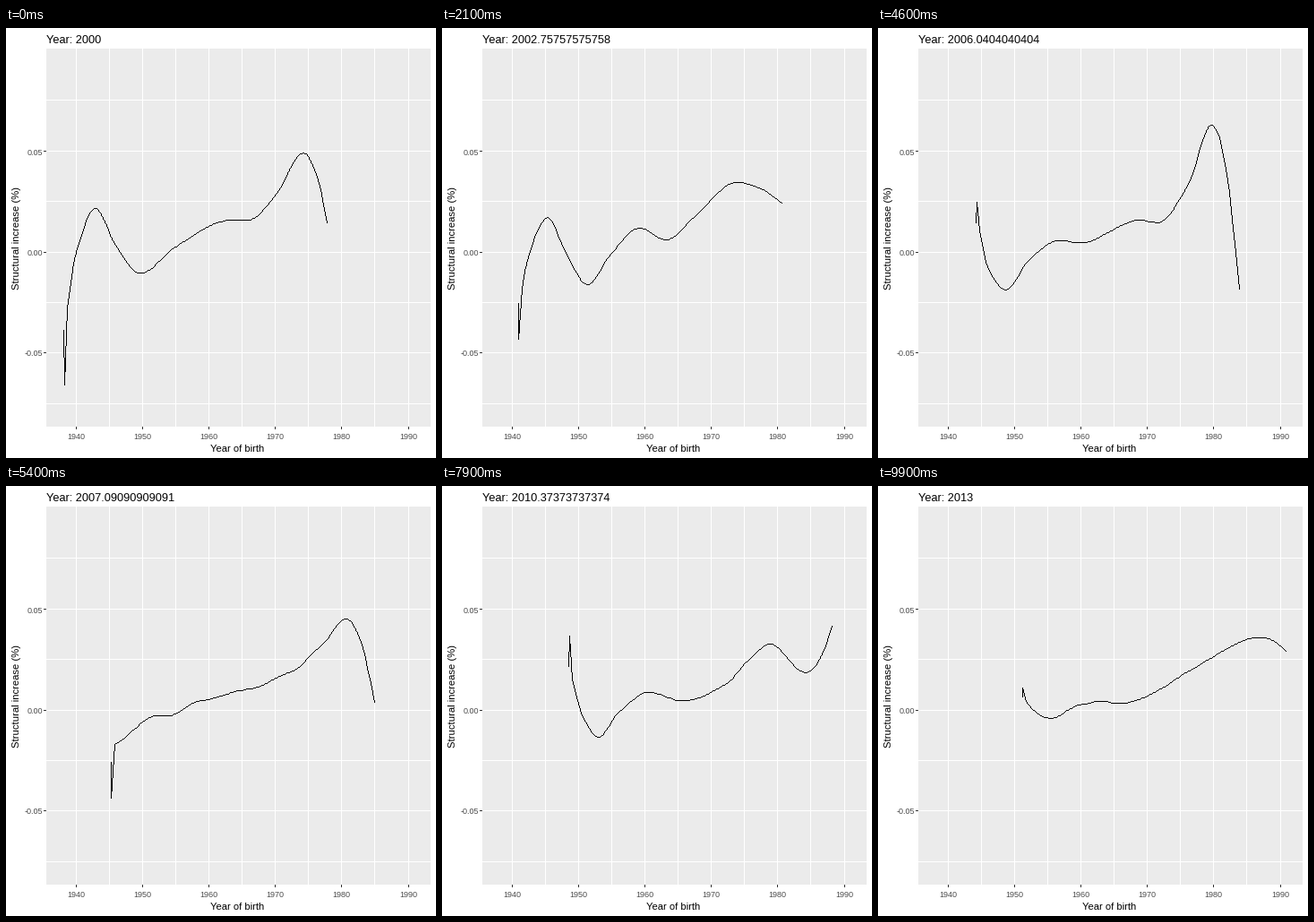
A matplotlib script for the animation above (10000 ms loop, 480 by 480 pixels).

```python
import numpy as np
import matplotlib.pyplot as plt
from matplotlib.animation import FuncAnimation
from matplotlib.patches import Rectangle

FRAMES, DPI = 100, 80
PT = 72 / DPI                    # points per pixel
ZERO = 250                       # pixel row of 0.00
LEFT, SPEED = 64.3, 96.7 / 99    # start of the curve and its drift per frame
U = np.linspace(3.7, 293.7, 79)  # distances from the start of the curve

# Height of the leading spike at each whole year
YEARS = np.round(np.arange(14) * 99 / 13)
SPIKE = (398, 340, 269, 373, 202, 42, 194, 337, 426, 154, 81, 311, 308, 225)

# How a change of the spike spreads along the curve
RIPPLE = np.r_[0.59, 1, 0.5 * np.exp(-U / 14) - 0.13 * np.exp(-((U - 38) / 18)**2)]


def left(i):
    return LEFT + SPEED * i


def spike(i):
    return np.interp(i, YEARS, SPIKE)


def smooth(x, y, at):
    """Cubic through the points, flat at turning points, free at both ends."""
    h, s = np.diff(x), np.diff(y) / np.diff(x)
    d = np.zeros(len(x))
    same = s[:-1] * s[1:] > 0
    d[1:-1][same] = 2 * (s[:-1] * s[1:])[same] / (s[:-1] + s[1:])[same]
    d[0], d[-1] = 2 * s[0] - d[1], 2 * s[-1] - d[-2]
    k = np.clip(np.searchsorted(x, at) - 1, 0, len(h) - 1)
    t, h = (at - x[k]) / h[k], h[k]
    rise = t * t * (3 - 2 * t)
    return (y[k] + (y[k + 1] - y[k]) * rise
            + h * t * (1 - t) * (d[k] * (1 - t) - d[k + 1] * t))


def pose(i, *points):
    """Whole curve at frame i: spike, then a body through a few points."""
    top = spike(i) - ZERO
    x, y = np.array(points, float).T
    x = np.r_[U[0], x - left(i)]
    x[-1] = U[-1]
    y = np.r_[ZERO + 0.42 * top, y]
    return np.r_[ZERO + 0.59 * top, ZERO + top, smooth(x, y, U)]


POSES = {i: pose(i, *points) for i, points in {
    0: [(80, 243), (99, 200.5), (122, 242), (149, 273.5), (190, 243), (250, 214),
        (270, 214), (302, 184), (331, 139), (358, 217)],
    21: [(100, 242), (117, 211), (139, 253), (162, 286), (188, 252), (220, 223),
         (249, 236), (286, 206), (327, 172), (378, 195)],
    37: [(121, 220), (146, 256.5), (198, 254), (230, 241), (250, 219), (279, 200),
         (309, 215), (340, 180), (365, 123), (394, 244)],
    46: [(125, 273), (142, 292), (167, 260), (201, 236.5), (225, 239.5),
         (293, 214), (311, 217), (345, 176), (372, 108), (403, 291)],
    63: [(145, 261), (163, 245), (196, 262), (228, 240), (264, 225), (290, 229),
         (330, 192), (357, 176), (397, 195), (419, 184)],
    79: [(157, 257), (174, 280), (197, 252), (230, 230), (268, 239.5), (315, 222),
         (340, 196), (366, 176), (405, 208), (435, 156)],
    99: [(192, 259), (222, 245), (250, 240), (270, 242.5), (298, 235), (350, 204),
         (427, 168.5), (455, 184)],
}.items()}
KEYS = sorted(POSES)


def curve(i):
    k = min(np.searchsorted(KEYS, i, side="right") - 1, len(KEYS) - 2)
    a, b = KEYS[k], KEYS[k + 1]
    t = (i - a) / (b - a)
    y = POSES[a] * (1 - t) + POSES[b] * t
    y = y + (spike(i) - y[1]) * RIPPLE
    return left(i) + np.r_[0, 0.4, U], y


def crisp(x, y):
    """Turn a polyline into one-pixel dashes, so that it has hard edges."""
    p = np.round(np.c_[x, y])
    dots = np.concatenate([
        np.round(np.linspace(a, b, int(abs(b - a).max()) + 1))
        for a, b in zip(p[:-1], p[1:])])
    gap = np.full(len(dots), np.nan)
    return (np.c_[dots[:, 0] - 0.3, dots[:, 0] + 0.3, gap].ravel(),
            np.c_[dots[:, 1], dots[:, 1], gap].ravel())


plt.rcParams["font.family"] = "Liberation Sans"
plt.rcParams["path.simplify"] = False
fig = plt.figure(figsize=(480 / DPI, 480 / DPI), dpi=DPI, facecolor="white")
ax = fig.add_axes([0, 0, 1, 1])
ax.set(xlim=(-0.5, 479.5), ylim=(479.5, -0.5))   # whole numbers are pixel centres
ax.axis("off")


def line(xs, ys, color, z):
    # Hard-edged strokes fill every pixel they touch, so a thin one gives one pixel
    return ax.plot(xs, ys, color=color, lw=0.4 * PT, antialiased=False, zorder=z,
                   solid_capstyle="butt", snap=False)[0]


def text(x, y, s, size, color="black", ha="left", **kw):
    return ax.text(x, y, s, fontsize=size * PT, color=color, ha=ha,
                   **{"va": "baseline", **kw})


ax.add_patch(Rectangle((44.5, 22.5), 429, 422, fc="#EBEBEB", lw=0))

for n in range(11):
    x = int(78 + 37.1 * n)
    line((x, x), (22.6, 444.4), "white", 2)
    if n % 2 == 0:
        line((x, x), (444.6, 447.4), "#333333", 3)
        text(x - 0.5, 458.5, str(1940 + 5 * n), 9, "#4D4D4D", "center")

for n in range(7):
    y = int(80.7 + 56.45 * n)
    line((44.6, 473.4), (y, y), "white", 2)
    if n % 2:
        line((41.6, 44.4), (y, y), "#333333", 3)
        text(41, y + 4, f"{0.05 * (3 - n) / 2:.2f}", 9, "#4D4D4D", "right")

text(258, 472.5, "Year of birth", 11.1, ha="center")
text(17, 234.5, "Structural increase (%)", 11.2, ha="right", va="center", rotation=90)
title = text(44.5, 16.5, "", 12.8)
path = line([], [], "black", 4)


def draw(i):
    path.set_data(*crisp(*curve(i)))
    title.set_text(f"Year: {2000 + 13 * i / 99:.15g}")
    return path, title


anim = FuncAnimation(fig, draw, frames=FRAMES, interval=100, repeat=True,
                     repeat_delay=0, blit=False)
plt.show()
```
